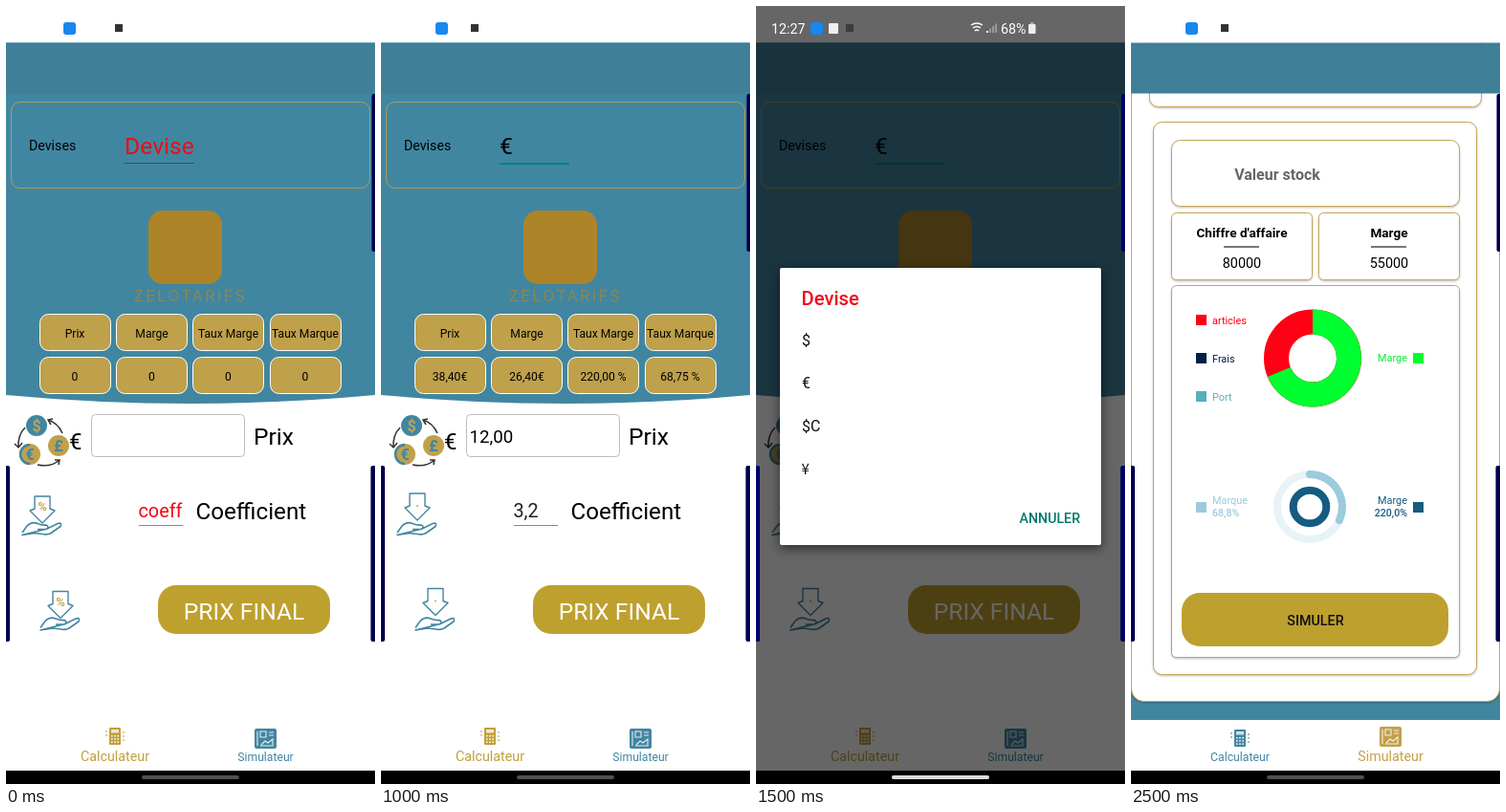
These frames come from a looping animation (386 by 814 pixels, 3000 ms). An HTML page:

```html
<!DOCTYPE html>
<html lang="fr">
<head>
<meta charset="utf-8">
<style>
  html, body { margin: 0; height: 100%; overflow: hidden; background: #fff; }
  svg { display: block; width: 386px; height: 814px; font-family: Roboto, sans-serif; }
  .card { filter: drop-shadow(0 1px 1px #0004); }
</style>
</head>
<body>
<svg id="stage" viewBox="0 0 386 814"></svg>
<script>
const TEAL = '#4186a1', GOLD = '#bea02f', BORDER = '#c6a757', RED = '#f00a18',
      GREEN = '#00796b', NAVY = '#00004f';

const rect = (x, y, w, h, r, fill, extra = '') =>
  `<rect x="${x}" y="${y}" width="${w}" height="${h}" rx="${r}" fill="${fill}" ${extra}/>`;
const circle = (x, y, r, fill, extra = '') =>
  `<circle cx="${x}" cy="${y}" r="${r}" fill="${fill}" ${extra}/>`;
const text = (s, x, y, size, fill = '#000', anchor = 'start', weight = 400, extra = '') =>
  `<text x="${x}" y="${y}" font-size="${size}" fill="${fill}" text-anchor="${anchor}" font-weight="${weight}" ${extra}>${s}</text>`;
const mid = (s, x, y, size, fill, weight) => text(s, x, y, size, fill, 'middle', weight);
const line = (d, color, width = 1, extra = '') =>
  `<path d="${d}" fill="none" stroke="${color}" stroke-width="${width}" ${extra}/>`;
const move = (x, y, body) => `<g transform="translate(${x} ${y})">${body}</g>`;
const card = (x, y, w, h, r = 9, fill = '#fff') =>
  rect(x + .5, y + .5, w - 1, h - 1, r, fill, `stroke="${BORDER}" class="card"`);
const field = (x, y, w, h) => rect(x + .5, y + .5, w - 1, h - 1, 4, '#fff', 'stroke="#bcbcbc"');

const brand = y => rect(149, y, 77, 77, 15, '#ad8428') +
  text('ZELOTARIFS', 193, y + 95, 16, '#8c8654', 'middle', 400,
    'letter-spacing="2.4" style="font-family:Inter,sans-serif"');

const statusIcons = (blueX, darkX, dark = '#333') =>
  rect(blueX, 17, 13, 13, 3, '#1788ee') + rect(darkX, 19, 8, 8, 0, dark);

const handles = (color = NAVY) => rect(382.5, 92, 6, 165, 2, color) +
  rect(381.5, 481, 7, 184, 2, color) + rect(-3, 481, 7, 184, 2, color);

function currencyIcon() {
  const coin = (s, x, y, fill, ink) => circle(x, y, 11, fill) + mid(s, x, y + 6, 16, ink, 700);
  return line('M59 447Q54 436 44 433m5-1l-5 1 3 5M20 441Q12 449 13 462m-4-4l4 4 4-5M33 480Q47 483 56 475m-5 0l5 0-1 5', '#333', 1.5) +
    coin('$', 32, 439, TEAL, '#c0a35a') + coin('€', 25, 469, '#c0a04a', TEAL) +
    line('M25 459a10 10 0 0 0 0 20', TEAL, 2.5) + coin('£', 55, 460, '#c0a04a', TEAL);
}

function handIcon(percent) {
  const y = percent ? 513 : 510;
  return line(`M30 ${y}h16v13l5 2-13 13-13-13 5-2z`, TEAL, 1.4, 'stroke-linejoin="round"') +
    (percent ? mid('%', 38, 528, 13, '#c39a3c', 500) : circle(38, 523, .9, '#c39a3c')) +
    line('M17 551L22 544Q27 539 33 541.5Q38 543.5 42 543Q46 545 42 547.5H33M43 547L54 541.500Q59 540 57 544.500L47 551.500Q44 553.500 38 552.500L30 551.500L17 553.500Z', TEAL, 1.6, 'stroke-linejoin="round"');
}

function navigation(simulator) {
  const [calc, sim] = simulator ? [TEAL, '#c3a04b'] : ['#c0a03c', TEAL];
  const cy = simulator ? 757 : 755, sy = simulator ? 754 : 756;
  let keys = '';
  for (let i = 0; i < 9; i++) keys += rect(2 + i % 3 * 3.2, 8 + (i / 3 | 0) * 3.2, 1.6, 1.5, 0, '#fff');
  const calculator = rect(0, 0, 12, 18, 1, calc) + rect(2, 2, 8, 3.5, 0, '#fff', 'opacity=".75"') + keys +
    line('M-3 3v8M15 4v10', calc, 1.5, 'stroke-dasharray="2 2" opacity=".7"');
  const dashboard = rect(0, 0, 23, 21, 2, sim) +
    line('M3 3v15M6 3h6v6h-6zM15 4h5M15 7h5M7 17l4-4 3 2 5-4v7h-13', '#fff', 1.1, 'opacity=".85"');
  return rect(0, 747, 386, 53, 0, '#fff') + move(108, cy, calculator) + move(260, sy, dashboard) +
    mid('Calculateur', 114, 790, simulator ? 12.3 : 14.3, calc) +
    mid('Simulateur', 271.5, 790, simulator ? 14.3 : 12.2, sim) +
    rect(0, 800, 386, 14, 0, '#000') + rect(142, 805, 102, 4, 2, '#505050');
}

const header = rect(0, 38.5, 386, 53, 0, '#3f7f98');

function calculator({ currency, ink = '#000', accent, sign, price = '', coef, values, icons }) {
  const inputX = sign === '$C' ? 105 : 89, percent = coef === 'coeff';
  const cell = (s, i, y) => rect([35, 115, 195, 276][i] + .5, y + .5, 74, 38, 9, '#bfa04b', 'stroke="#fff"') +
    mid(s, [72, 152.5, 232.5, 313][i], y + 24.5, 12.1);
  return statusIcons(...icons) +
    `<path d="M0 38.500H386V407Q193 425 0 407Z" fill="${TEAL}"/>` + header +
    rect(5.5, 100.5, 375, 90, 9, 'none', 'stroke="#a99c5c"') +
    text('Devises', 24, 151, 14.2) + text(currency, 124, 155, 24.7, ink) +
    (accent ? rect(124, 164, 73, 2, 0, '#008577') : rect(124, 164, 73, 1, 0, '#345563')) +
    brand(214) +
    ['Prix', 'Marge', 'Taux Marge', 'Taux Marque'].map((s, i) => cell(s, i, 322)).join('') +
    values.map((s, i) => cell(s, i, 367)).join('') +
    currencyIcon() + text(sign, 66, 464, 24) +
    field(inputX, 427, 250 - inputX, 45) + text(price, inputX + 3.5, 457, 18.7) +
    text('Prix', 259, 459, 24.6) +
    text(coef, 138.5, 535, 19.8, percent ? RED : '#222') + rect(139, 543, 46, 1, 0, '#888') +
    text('Coefficient', 198.5, 537, 24.2) +
    handIcon(percent) + move(19, 99.5, handIcon(percent)) +
    rect(159, 606, 180, 51, 19, GOLD) + mid('PRIX FINAL', 249, 641.5, 24.6, '#fff') +
    navigation(false) + handles();
}

function currencyDialog() {
  const bars = [0, 1, 2, 3].map(i => rect(241 + i * 3, 26 - i * 2.5, 2, 2 + i * 2.5, 0, i < 1 ? '#fff' : '#999')).join('');
  return rect(0, 0, 386, 800, 0, '#000', 'opacity=".6"') + handles('#00006c') +
    text('12:27', 16, 28.5, 14.3, '#fff') + statusIcons(57, 94, '#3c3c3c') + rect(76, 18, 10, 11, 1, '#eee') +
    line('M225 20q6-4 12 0M227 23q4-3 8 0M229 26q2-2 4 0', '#fff', 1.5) + bars +
    text('68%', 256, 28.5, 14.3, '#fff') + rect(285, 19, 7.5, 10, 1, '#eee') + rect(287, 17, 3.5, 2, 0, '#aaa') +
    rect(25, 274, 336, 290, 2, '#fff', 'style="filter:drop-shadow(0 4px 6px #0008)"') +
    text('Devise', 47.5, 313, 20.2, RED, 'start', 500) +
    ['$', '€', '$C'].map((s, i) => text(s, 48, 355 + i * 45, 16, '#111')).join('') +
    text('¥', 47.5, 490, 15, '#111', 'start', 400, 'style="font-family:\'Noto Sans CJK JP\',\'Noto Sans CJK SC\',sans-serif"') +
    text('ANNULER', 339, 541, 14.2, GREEN, 'end', 500) + rect(142, 805, 102, 4, 2, '#ddd');
}

function charts() {
  const point = (cx, cy, r, part) => {
    const a = part * 2 * Math.PI;
    return `${cx + r * Math.sin(a)} ${cy - r * Math.cos(a)}`;
  };
  const arc = (cx, cy, r, part, color, width, extra) =>
    line(`M${cx} ${cy - r}A${r} ${r} 0 ${+(part > .5)} 1 ${point(cx, cy, r, part)}`, color, width, extra);
  const ring = (cx, cy, r, color, width) => circle(cx, cy, r, 'none', `stroke="${color}" stroke-width="${width}"`);
  const legend = (s, y, color) => rect(68, y, 11, 11, 0, color) + text(s, 85, y + 9.5, 10.9, color);
  const pale = '#9bcbdc', dark = '#145c80';
  return ring(190, 368.5, 38, '#ff0014', 26) + arc(190, 368.5, 38, .6875, '#00ff30', 26) +
    legend('articles', 323, '#ff0014') + legend('Frais', 363, '#001f48') + legend('Port', 403, '#56afbd') +
    text('Marge', 289, 372, 10.9, '#00f030', 'end') + rect(295, 363, 11, 11, 0, '#00ff30') +
    ring(187, 524, 34, '#e8f3f7', 8) + arc(187, 524, 34, .318, pale, 8, 'stroke-linecap="round"') +
    ring(187, 524, 17.3, dark, 8) +
    rect(68, 519, 11, 11, 0, pale) + text('Marque', 85, 521, 10.9, pale) + text('68,8%', 85, 534, 10.6, pale, 'start', 500) +
    text('Marge', 289, 521, 10.9, dark, 'end') + text('220,0%', 289, 534, 10.6, dark, 'end', 500) +
    rect(295, 519, 11, 11, 0, dark);
}

function simulator(scroll) {
  const form = brand(124) + card(0, 268, 386, 1030, 13) +
    card(19, 287, 348, 59, 9, TEAL) + mid('Simulation du budget', 193, 323, 16, '#000', 700) +
    card(23, 361, 339, 78) + text('Coût des articles', 47, 405.5, 15.3) +
    field(166, 379, 99, 42) + mid('25000', 215.5, 406, 16) +
    text('3,2', 301, 406, 16, '#333') + rect(301, 412, 39, 2, 0, '#008577') +
    card(23, 464, 339, 78) + text('Frais de port', 47, 508, 14.2) +
    field(229, 482, 111, 42) + mid('0', 284.5, 509, 16) +
    text('Activer %', 106, 582, 14.2) + rect(250, 573, 29, 13, 6.5, '#aaa') + circle(258, 580, 9, '#e9e9e9', 'class="card"') +
    card(19, 598, 348, 78) + text('Frais Divers', 37.5, 642, 14.1) +
    field(221, 616, 123, 42) + mid('0', 282.5, 643, 16);
  const total = (s, value, x) => card(x, 216, 148, 71, 5) + mid(s, x + 74, 242, 13.6, '#000', 700) +
    rect(x + 55, 251, 37, 2, 0, '#777') + mid(value, x + 74, 273.5, 14.4);
  const results = card(23, 121, 339, 579) + card(42, 140, 302, 70) +
    mid('Valeur stock', 153, 181.5, 16, '#666', 700) +
    total("Chiffre d'affaire", '80000', 42) + total('Marge', '55000', 196) +
    card(42, 292, 302, 390, 5) + charts() +
    rect(53, 614, 279, 56, 19, GOLD) + mid('SIMULER', 193, 648, 14.3, '#111', 500);
  return statusIcons(57, 94) + rect(0, 38.5, 386, 709, 0, TEAL) +
    move(0, -scroll, form + move(0, 570, results)) +
    rect(0, 0, 386, 38.5, 0, '#fff') + statusIcons(57, 94) + header +
    navigation(true) + handles();
}

const euro = calculator({ currency: '€', accent: true, sign: '€', price: '12,00', coef: '3,2',
  values: ['38,40€', '26,40€', '220,00 %', '68,75 %'], icons: [57, 94] });
const scenes = [
  calculator({ currency: 'Devise', ink: RED, sign: '€', coef: 'coeff', values: [0, 0, 0, 0], icons: [60, 114] }),
  calculator({ currency: '$C', sign: '$C', price: '12', coef: '3,3',
    values: ['39,60$C', '27,60$C', '230,00 %', '69,70 %'], icons: [60, 114] }),
  euro,
  euro + currencyDialog(),
  simulator(0),
  simulator(570)
];

const stage = document.getElementById('stage');
const start = performance.now();
let shown = -1;
function draw() {
  const index = Math.floor((performance.now() - start) % 3000 / 500);
  if (index !== shown) stage.innerHTML = scenes[shown = index];
  requestAnimationFrame(draw);
}
draw();
</script>
</body>
</html>
```
